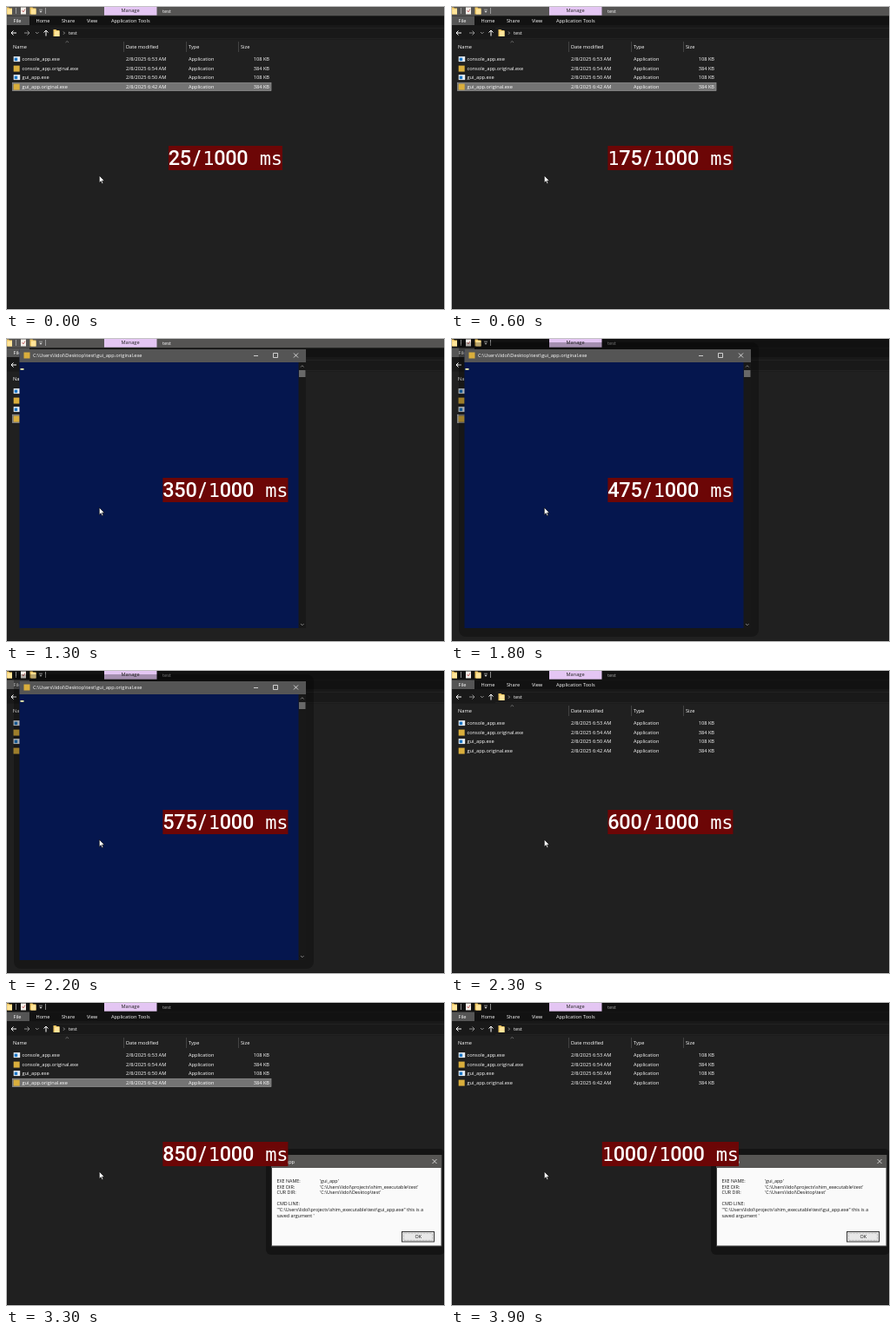
An HTML page for the animation above (4 s loop, 505x350 px).

```html
<!DOCTYPE html>
<html lang="en">
<head>
<meta charset="utf-8">
<title>Launch timing</title>
<style>
  html, body { margin: 0; width: 100%; height: 100%; overflow: hidden; background: #202020; }
  svg { display: block; width: 505px; height: 350px; }
  text { font: 5.65px "Open Sans", sans-serif; fill: #fff; white-space: pre; }
  #message text { font-size: 5.4px; fill: #111; }
  #counter text { font: 500 semi-condensed 23.5px Roboto, sans-serif; fill: #fff; text-anchor: middle; }
  #counter text.mono { font: 22px "DejaVu Sans Mono", monospace; }
</style>
</head>
<body>
<svg viewBox="0 0 505 350">
  <defs>
    <g id="folder"><path d="M0 0h3l1 1h3v7h-7z" fill="#efc765"/><path d="M1.5 2h5.5v6h-5.5z" fill="#ffe59a"/></g>
    <g id="app"><path d="M0 0h7.5v6h-7.5z" fill="#e8eef4"/><path d="M1 1.5h3.5v3.5h-3.5z" fill="#1c78c8"/></g>
    <path id="badge" d="M0 0h7v7h-7z" fill="#d9ae3c"/>
    <path id="close" d="M-2.5-2.5l5 5m0-5l-5 5" stroke="#eee" stroke-width=".8"/>
  </defs>

  <g id="explorer">
    <rect width="505" height="350" fill="#202020"/>
    <rect id="titlebar" width="505" height="11.5"/>
    <rect y="11.5" width="505" height="11" fill="#121212"/>
    <rect y="22.5" width="505" height="16" fill="#191919"/>
    <path d="M51 25.5h454M51 37.5h454" stroke="#262626" stroke-width=".7"/>
    <rect x="113" y="1" width="60.5" height="9.7" fill="#e4c6f3"/>
    <rect x="1" y="11.5" width="26" height="10.5" fill="#555"/>
    <use href="#folder" x="0" y="1.5"/>
    <use href="#folder" x="27.5" y="1.5"/>
    <path d="M17 1.5h6v8h-6z" fill="#f4f0ea"/>
    <path d="M18.5 5l1.5 2 2-3.5" fill="none" stroke="#b55" stroke-width=".8"/>
    <path d="M11.5 2v7M45.5 2v7M38 4.2h4" stroke="#bbb" stroke-width=".7"/>
    <path d="M38.3 5.8h3.4l-1.7 2z" fill="#ddd"/>
    <g fill="none" stroke="#fff">
      <path d="M12 31h-6m2.5-2.5l-2.5 2.5 2.5 2.5M46 34.5v-6.5m-2.5 2.5l2.5-2.5 2.5 2.5"/>
      <path d="M21 31h6m-2.5-2.5l2.5 2.5-2.5 2.5M34 30l1.8 1.8 1.8-1.8M66 29.5l1.5 1.6-1.5 1.6" stroke="#aaa" stroke-width=".8"/>
      <path d="M68.5 42l1.8-1.5 1.8 1.5" stroke="#888" stroke-width=".7"/>
      <path d="M135.5 41v12M207.5 41v12M267.5 41v12" stroke="#4c4c4c" stroke-width=".8"/>
    </g>
    <use href="#folder" x="54.5" y="27"/>
    <rect id="selection" x="7.5" y="88.3" width="297.5" height="9.2" fill="#747474" stroke="#969696" stroke-width=".7"/>
    <g id="labels"></g>
    <g id="rows"></g>
  </g>

  <g id="console">
    <rect id="consoleShadow" x="9" y="5" width="345" height="339" rx="8" opacity=".28"/>
    <rect x="15.5" y="13" width="329.5" height="321" fill="#05164e"/>
    <rect x="15.5" y="13" width="329.5" height="15" fill="#555"/>
    <use href="#badge" x="20.5" y="16.5"/>
    <path d="M285 20.5h5M307.5 17.5h5v5h-5z" fill="none" stroke="#eee" stroke-width=".8"/>
    <use href="#close" x="333.5" y="20"/>
    <rect x="336.5" y="28" width="8.5" height="306" fill="#181818"/>
    <rect x="337" y="37" width="7.5" height="8" fill="#686868"/>
    <path d="M339 33.5l1.8-1.8 1.8 1.8M339 329l1.8 1.8 1.8-1.8" fill="none" stroke="#999" stroke-width=".8"/>
    <rect x="16.5" y="35" width="4" height="1.8" fill="#eeeeb0"/>
  </g>

  <g id="dialog">
    <rect id="dialogShadow" x="299" y="169" width="206" height="122" rx="6" fill="#141414"/>
    <rect x="305.5" y="176.5" width="195.5" height="104.5" fill="#1e1e1e" stroke="#505050" stroke-width=".7"/>
    <rect x="305" y="176" width="196" height="15" fill="#575654"/>
    <use href="#close" x="493" y="183.5"/>
    <g id="message">
      <rect x="306" y="191" width="194.5" height="89.5" fill="#fafafa"/>
      <rect x="455.5" y="264.5" width="37" height="11.5" fill="#e8e8e8" stroke="#222" stroke-width=".9"/>
      <rect x="457.5" y="266.3" width="33" height="8" fill="none" stroke="#666" stroke-width=".5" stroke-dasharray=".7"/>
    </g>
  </g>

  <path d="M107.3 195.2v8.2l1.9-1.7 1.4 3 1.3-.6-1.3-2.9h2.6z" fill="#fff" stroke="#000" stroke-width=".6"/>
  <g id="counter"></g>
  <path d="M.5.5h504v349h-504z" fill="none" stroke="#c4c4c4"/>
</svg>

<script>
const $ = id => document.getElementById(id);

function add(parent, tag, attrs, content = '') {
  const el = document.createElementNS('http://www.w3.org/2000/svg', tag);
  for (const key in attrs) el.setAttribute(key, attrs[key]);
  el.textContent = content;
  return parent.appendChild(el);
}
const label = (parent, x, y, content, attrs) => add(parent, 'text', { x, y, ...attrs }, content);
const show = (id, visible) => $(id).setAttribute('visibility', visible ? 'inherit' : 'hidden');

// Explorer text
const labels = $('labels');
label(labels, 132.5, 7.3, 'Manage', { style: 'fill:#222' });
const title = label(labels, 180, 7.6, 'test');
[[8.5, 'File'], [34.5, 'Home'], [64, 'Share'], [93, 'View'], [121, 'Application Tools']]
  .forEach(([x, name]) => label(labels, x, 19, name));
label(labels, 72, 33, 'test');
[[8, 'Name'], [138, 'Date modified'], [210, 'Type'], [270, 'Size']]
  .forEach(([x, name]) => label(labels, x, 49, name));

[['console_app.exe', '6:53', 108], ['console_app.original.exe', '6:54', 384],
 ['gui_app.exe', '6:50', 108], ['gui_app.original.exe', '6:42', 384]]
  .forEach(([name, time, size], i) => {
    const rows = $('rows'), y = 63.4 + i * 10.5;
    add(rows, 'use', { href: i % 2 ? '#badge' : '#app', x: 8.7, y: y - 5.3 });
    label(rows, 18.5, y, name);
    label(rows, 138, y, `2/8/2025 ${time} AM`);
    label(rows, 210, y, 'Application');
    label(rows, 303, y, size + ' KB', { 'text-anchor': 'end' });
  });

// Window text
const home = 'C:\\Users\\lidol\\', project = home + 'projects\\shim_executable\\test';
label($('console'), 31, 22.3, home + 'Desktop\\test\\gui_app.original.exe');
label($('dialog'), 311.5, 185.5, 'gui_app');
[[311.5, 208, 'EXE NAME:'], [361, 208, "'gui_app'"],
 [311.5, 214.6, 'EXE DIR:'], [361, 214.6, `'${project}'`],
 [311.5, 221.2, 'CUR DIR:'], [361, 221.2, `'${home}Desktop\\test'`],
 [311.5, 234.4, 'CMD LINE:'], [311.5, 241, `'"${project}\\gui_app.exe" this is a`],
 [311.5, 247.6, "saved argument '"], [470.5, 272.2, 'OK']]
  .forEach(line => label($('message'), ...line));

// Fixed-pitch counter centred on its red box
function drawCounter(value) {
  const counter = $('counter'), content = value + '/1000 ms', pitch = 13.1;
  const width = content.length * pitch, left = 252.4 - width / 2;
  counter.replaceChildren();
  add(counter, 'rect', { x: left, y: 161, width, height: 28, fill: '#6c0606' });
  [...content].forEach((char, i) =>
    label(counter, left + (i + .5) * pitch, 183, char, /[1ms]/.test(char) ? { class: 'mono' } : {}));
}

// Steps of 100 ms; a new window takes focus one step after it opens,
// and the file selection fades a little later
const consoleOpen = 13, consoleClose = 23, refocus = 25, dialogOpen = 30, fadeDelay = 6;
let lastStep = -1;

function render() {
  const step = Math.floor(performance.now() % 4000 / 100);
  if (step !== lastStep) {
    lastStep = step;
    const opened = step >= dialogOpen ? dialogOpen
      : step >= consoleOpen && step < refocus ? consoleOpen : Infinity;
    const focused = step > opened;
    $('titlebar').setAttribute('fill', focused ? '#111' : '#555453');
    title.style.fill = focused ? '#aaa' : '#fff';
    show('selection', step < opened + fadeDelay);
    show('console', step >= consoleOpen && step < consoleClose);
    show('consoleShadow', focused);
    show('dialog', step >= dialogOpen);
    show('dialogShadow', focused);
    show('message', focused);
    drawCounter((step + 1) * 25);
  }
  requestAnimationFrame(render);
}
render();
</script>
</body>
</html>
```
